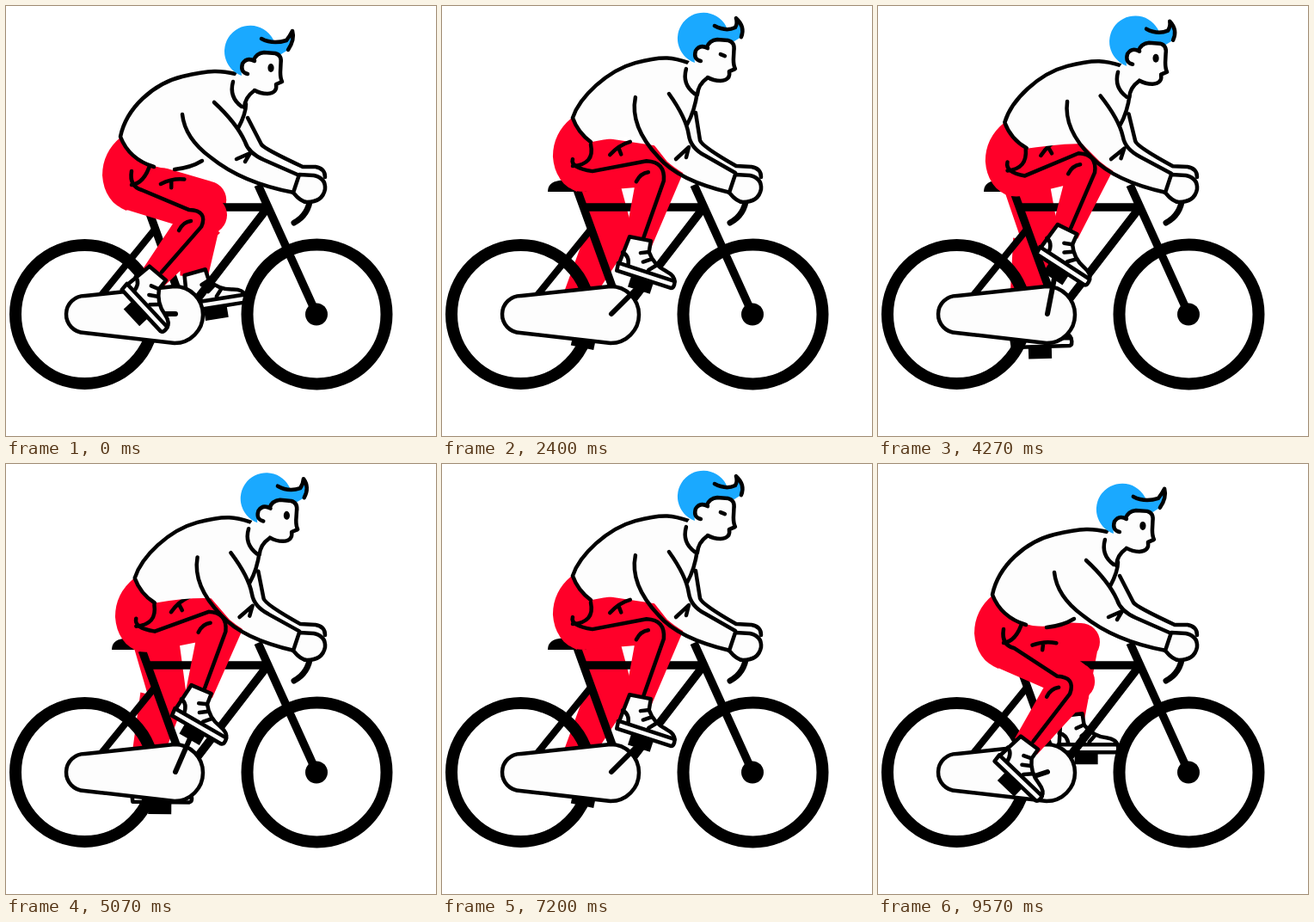
An HTML page for the animation above (9.61 s loop, 500x500 px).

```html
<!DOCTYPE html>
<html>
<head>
<meta charset="utf-8">
<title>Cyclist</title>
<style>
html, body { margin: 0; width: 100%; height: 100%; overflow: hidden; background: #fff; }
svg { display: block; width: 100vw; height: 100vh; }
.line { fill: none; stroke: #000; stroke-width: 4.5; stroke-linecap: round; stroke-linejoin: round; }
.skin { fill: #fdfdfd; }
.red { fill: #ff0029; }
.blue { fill: #1aa9ff; }
.tube { fill: none; stroke: #000; stroke-width: 9.5; }
</style>
</head>
<body>
<svg viewBox="0 0 500 500">
  <defs>
    <g id="shoe">
      <rect x="-13" y="-9" width="27" height="15"/>
      <path class="line skin" d="M-31 -16 L-29 -50 L-4 -53 L-2 -40 Q8 -27 24 -25 Q36 -23 37 -16 Z"/>
      <path class="line" d="M-31 -30 Q-22 -29 -20 -17 M-2 -40 L-11 -36 M3 -33 L-5 -27 M11 -28 L4 -20"/>
      <path class="line skin" d="M-32 -17 H37 Q39 -9 35 -8 H-31 Z"/>
    </g>
  </defs>

  <path id="farLeg" class="red"/>
  <use id="farShoe" href="#shoe"/>

  <g class="tube">
    <circle cx="91.5" cy="358.5" r="80.5" stroke-width="14"/>
    <circle cx="361.5" cy="358.5" r="81" stroke-width="14"/>
    <path d="M293 208 L361 358 M162 234 H305 M303 236 L223 340 M155 208 L200 332"/>
    <path d="M172 261 L111 336" stroke-width="8"/>
    <path d="M354 222 Q352 243 335 252" stroke-width="7" stroke-linecap="round"/>
  </g>
  <circle cx="361" cy="358.5" r="13"/>
  <path d="M123 216 Q123 205 136 203 L162 199 L168 216 Z"/>
  <path class="line skin" d="M92 337 L196 326 A33 33 0 1 1 196 392 L91 380 A21.5 21.5 0 0 1 92 337 Z"/>
  <line id="crank" class="line" x1="197" y1="358" style="stroke-width:6"/>

  <path id="nearLeg" class="red"/>
  <path id="seam" class="line"/>
  <path id="crease" class="line" d="M30 -11 Q40 -23 53 -27 M40 -19 L43 -12"/>
  <use id="nearShoe" href="#shoe"/>

  <path id="torso" class="skin"/>
  <path id="folds" class="line"/>
  <path id="hem" class="line" d="M196 190 Q215 188 228 180"/>
  <path class="line skin" d="M341 196 L358 197 Q372 200 371 213 Q368 228 350 228 Q343 228 334 217 Z"/>

  <g id="head">
    <path class="skin" d="M284 70 L283 92 L297 104 Q299 92 308 84 Q330 92 335 76 L341 72 L340 42 L305 38 Z"/>
    <path class="blue" d="M294 66 A30 30 0 1 1 333 30 L340 41 Q312 38 306 49 Q292 50 294 66 Z"/>
    <path id="quiffFill" class="blue"/>
    <path id="quiff" class="line"/>
    <path class="line" d="M308 48 Q311 40 320 39 L333 40 Q341 42 339.5 52 L339 62 Q339 69 341 73 L334 76 Q336 86 324 87 Q316 87 309 83 M308 84 Q298 91 297 103"/>
    <path class="line skin" d="M309 49 Q300 44 295 52 Q292 62 301 64"/>
    <path class="line" d="M284 73 Q279 91 294 102"/>
    <ellipse id="eye" cx="328" cy="57" rx="3.6" ry="5"/>
    <path id="lid" class="line" d="M324 56 L329 58"/>
  </g>
</svg>
<script>
const LOOP = 9610, CYCLE = 120, RAD = Math.PI / 180;
const el = {};
document.querySelectorAll('[id]').forEach(e => el[e.id] = e);
const set = (id, name, v) => el[id].setAttribute(name, v);
const n = v => v.toFixed(2);
const at = (p, x, y) => n(p.x + x) + ' ' + n(p.y + y);
const toward = (a, b, k) => ({ x: a.x + (b.x - a.x) * k, y: a.y + (b.y - a.y) * k });

// Periodic smooth curve; rise is the gain in value per period.
function curve(keys, x, period, rise = 0) {
  const key = i => {
    const w = Math.floor(i / keys.length), k = keys[i - w * keys.length];
    return [k[0] + w * period, k[1] + w * rise];
  };
  x = ((x % period) + period) % period;
  let i = -1;
  while (key(i + 1)[0] <= x) i++;
  const [p, a, b, q] = [key(i - 1), key(i), key(i + 1), key(i + 2)];
  const d = b[0] - a[0], u = (x - a[0]) / d;
  const ma = (b[1] - p[1]) / (b[0] - p[0]) * d, mb = (q[1] - a[1]) / (q[0] - a[0]) * d;
  const u2 = u * u, u3 = u2 * u;
  return (2 * u3 - 3 * u2 + 1) * a[1] + (u3 - 2 * u2 + u) * ma + (3 * u2 - 2 * u3) * b[1] + (u3 - u2) * mb;
}

const TURN = [[0, 0], [26, 472], [60, 855], [88, 1202], [106, 1541]];
const NOD = [[0, 0], [26, .4], [44, 0], [60, 0], [76, .25], [88, 1], [98, .3], [106, 0]];
const FLAP = [[0, 1], [11, .1], [26, 1], [42, .15], [50, .8], [60, 0], [71, .9], [79, .3], [88, 1], [106, .2], [113, .8]];
const TILT = [[0, 47], [45, 47], [101, 33], [122, 27], [135, 18], [180, -9], [230, -10], [270, -3], [295, 1], [315, 12], [342, 44]];

// Blends two path strings with the same commands.
function mix(a, b, k) {
  const to = b.match(/-?[\d.]+/g);
  let i = 0;
  return a.replace(/-?[\d.]+/g, v => n(+v + (to[i++] - v) * k));
}

const LOW = {
  torso: 'M133 152 C140 118 172 90 205 82 S250 75 267 79 L290 97 Q281 104 279 116 L281 130 L297 162 L345 187 L338 218 Q280 206 245 180 L228 181 Q205 191 180 188 Q145 182 133 152 Z',
  folds: 'M133 152 C140 118 172 90 205 82 S250 75 267 79 M133 152 Q143 178 172 187 ' +
    'M205 126 Q208 154 238 176 Q275 206 335 217 M242 112 Q268 136 278 158 Q282 171 300 179 L341 197 ' +
    'M281 130 L297 161 Q300 166 345 187 L360 187 Q371 189 371 199 M279 114 Q279 125 270 142 M268 178 L284 171 L278 181'
};
const HIGH = {
  torso: 'M152 130 C160 106 192 75 225 66 S270 60 287 66 L308 84 Q299 92 297 103 L295 124 L300 157 L342 186 L338 218 Q290 205 262 181 L240 153 Q215 150 173 158 Q160 149 152 130 Z',
  folds: 'M152 130 C160 106 192 75 225 66 S270 60 287 66 M152 130 Q158 147 173 158 ' +
    'M225 106 Q218 140 252 176 Q275 203 335 217 M264 102 Q284 130 287 150 Q289 165 306 174 L341 194 ' +
    'M295 124 L300 156 Q302 163 342 186 L360 187 Q371 189 371 199 M297 100 Q294 122 285 138 M272 178 L287 164 L284 176'
};

// Body rises quickly while the near pedal comes over the top.
function lift(deg) {
  const d = (((deg + 8) % 360) + 360) % 360;
  const phase = d < 148 ? d / 148 * 180 : 180 + (d - 148) / 212 * 180;
  return Math.pow((1 - Math.cos(phase * RAD)) / 2, 1.6);
}

function foot(deg) {
  const tilt = curve(TILT, deg, 360), c = Math.cos(tilt * RAD), s = Math.sin(tilt * RAD);
  const x = 197 - 47 * Math.cos(deg * RAD), y = 358 - 47 * Math.sin(deg * RAD);
  return { x, y, tilt, ankle: { x: x - 17 * c + 51 * s, y: y - 17 * s - 51 * c } };
}

function knee(hip, ankle, thigh, shin) {
  const dx = ankle.x - hip.x, dy = ankle.y - hip.y;
  const d = Math.min(Math.hypot(dx, dy), thigh + shin - 1);
  const a = (thigh * thigh - shin * shin + d * d) / (2 * d);
  const h = Math.sqrt(thigh * thigh - a * a);
  return { x: hip.x + (dx * a + dy * h) / d, y: hip.y + (dy * a - dx * h) / d };
}

// All parts of a leg share one winding, so overlaps stay filled.
const disc = (p, r) => `M${at(p, -r, 0)} a${r} ${r} 0 1 1 ${2 * r} 0 a${r} ${r} 0 1 1 ${-2 * r} 0 Z`;
const seat = p => `M${at(p, -8, 33)} Q${at(p, -34, 22)} ${at(p, -36, -8)} Q${at(p, -36, -35)} ${at(p, -14, -53)} L${at(p, 20, -30)} Z`;
function taper(a, ra, b, rb) {
  const d = Math.hypot(b.x - a.x, b.y - a.y), x = (b.y - a.y) / d, y = (a.x - b.x) / d;
  return `M${at(a, x * ra, y * ra)} L${at(b, x * rb, y * rb)} L${at(b, -x * rb, -y * rb)} L${at(a, -x * ra, -y * ra)} Z`;
}

function limb(name, hip, deg, thigh, shin, r) {
  const f = foot(deg), k = knee(hip, f.ankle, thigh, shin), calf = { x: k.x - 6, y: k.y + 4 };
  const leg = disc(hip, r) + taper(hip, r, k, 22) + disc(k, 22) + taper(calf, 26, toward(k, f.ankle, 1.06), 16);
  set(name + 'Shoe', 'transform', `translate(${at(f, 0, 0)}) rotate(${n(f.tilt)})`);
  return { f, k, leg };
}

function draw(frame) {
  const deg = curve(TURN, frame, CYCLE, 1800), up = lift(deg);
  const hip = { x: 148 + 17 * up, y: 205 - 22 * up };

  const far = limb('far', { x: hip.x + 8, y: hip.y + 4 }, deg + 180, 80, 86, 28);
  set('farLeg', 'd', far.leg);
  const { f, k, leg } = limb('near', hip, deg, 95, 90, 33);
  set('nearLeg', 'd', seat(hip) + leg);
  set('crank', 'x2', n(f.x));
  set('crank', 'y2', n(f.y));

  const shin = toward(k, f.ankle, .2), cuff = toward(k, f.ankle, .98), back = -2 - 11 * up;
  set('seam', 'd',
    `M${at(hip, back, -13 + 8 * up)} Q${at(hip, back - 3, 5)} ${at(hip, 10, 9)} L${at(k, -22, -6)} Q${at(k, 0, -5)} ${at(shin, 4, 0)} L${at(cuff, 4, 0)}` +
    `M${at(hip, back, 3)} Q${at(hip, 13, 1)} ${at(hip, 20 - 12 * up, -22)}` +
    `M${at(k, -34, 18)} Q${at(k, -29, 8)} ${at(k, -20, 7)}`);
  const lean = Math.atan2(k.y - hip.y, k.x - hip.x) / RAD;
  set('crease', 'transform', `translate(${at(hip, 0, 0)}) rotate(${n(lean)})`);

  set('torso', 'd', mix(LOW.torso, HIGH.torso, up));
  set('folds', 'd', mix(LOW.folds, HIGH.folds, up));
  set('hem', 'visibility', up < .4 ? 'visible' : 'hidden');

  const nod = curve(NOD, frame, CYCLE);
  set('head', 'transform',
    `translate(${n(-20 * (1 - up) + 5 * nod)} ${n(15 * (1 - up) + 7 * nod)}) rotate(${n(10 * nod)} 300 80)`);
  const w = curve(FLAP, frame, CYCLE), tip = 342 + 11 * w;
  const lock = `M317 23 Q330 30 ${n(341 + 5 * w)} 25 Q${n(344 + 6 * w)} 20 ${n(tip)} 14 Q${n(353 + 3 * w)} 24 348 36`;
  set('quiff', 'd', lock);
  set('quiffFill', 'd', lock + ' L340 41 L318 38 Z');

  const shut = Math.abs(frame % CYCLE - 60) <= 2;
  set('eye', 'visibility', shut ? 'hidden' : 'visible');
  set('lid', 'visibility', shut ? 'visible' : 'hidden');
}

// Five drawings per 200 ms, the first of them held longer.
function frameAt(ms) {
  const r = ms % 200;
  const step = [70, 100, 130, 170].filter(v => r >= v).length;
  return Math.min(239, Math.floor(ms / 200) * 5 + step);
}

let start;
function tick(now) {
  if (start === undefined) start = now;
  draw(frameAt((now - start) % LOOP));
  requestAnimationFrame(tick);
}
draw(0);
requestAnimationFrame(tick);
</script>
</body>
</html>
```
